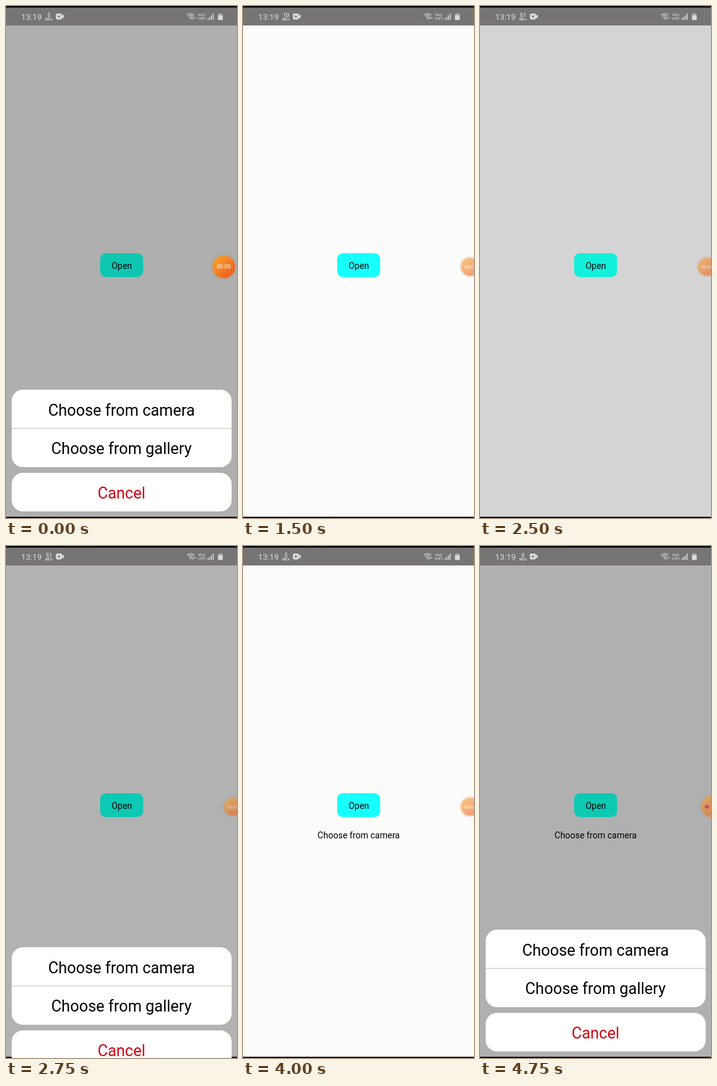
Write an HTML page that moves like this. It is 368 px wide and 816 px high and loops after 5 s.

```html
<!DOCTYPE html>
<html lang="en">
<head>
<meta charset="utf-8">
<title>Action sheet</title>
<style>
  html, body { margin: 0; width: 100%; height: 100%; overflow: hidden; background: #000; }
  svg { display: block; width: 368px; height: 816px; font-family: Roboto, Arial, sans-serif; }
  text { text-anchor: middle; }

  /* every state holds for a multiple of 250 ms (5 %) */
  .page, .button, .sheet, .result, .bubble, .clock, .dot, .rate text, .time text {
    animation: 5s step-end infinite;
  }

  .page { animation-name: page; }
  @keyframes page {
    0% { fill: #aeafae; }
    30% { fill: #fbfbf9; }
    50% { fill: #d4d4d4; }
    55% { fill: #b2b2b2; }
    70% { fill: #fbfbf9; }
    85% { fill: #cecece; }
    90%, 100% { fill: #b0b0b0; }
  }

  .button { animation-name: button; }
  @keyframes button {
    0% { fill: #0fc6b3; }
    30% { fill: #17ffff; }
    50% { fill: #12efdb; }
    55% { fill: #0dc9b4; }
    70% { fill: #17ffff; }
    85% { fill: #14e9d5; }
    90%, 100% { fill: #0dc9b4; }
  }

  .sheet { animation-name: sheet; font-size: 25px; }
  @keyframes sheet {
    0% { transform: none; }
    30% { transform: translateY(300px); }
    55% { transform: translateY(28px); }
    60% { transform: none; }
    70% { transform: translateY(300px); }
    90% { transform: translateY(7px); }
    95%, 100% { transform: none; }
  }

  .result { animation-name: late; }
  @keyframes late { 0% { opacity: 0; } 70%, 100% { opacity: 1; } }

  .bubble { animation-name: bubble; }
  @keyframes bubble {
    0% { transform: translate(347px, 415.5px); opacity: 1; }
    10% { transform: translate(358px, 415.5px); opacity: 1; }
    15% { transform: translate(360px, 415.5px) scale(.88); opacity: 1; }
    20% { transform: translate(361.5px, 415.5px) scale(.806); opacity: .8; }
    25% { transform: translate(361.5px, 415.5px) scale(.806); opacity: .6; }
    95%, 100% { transform: translate(371px, 415px); opacity: .6; }
  }

  .clock { animation-name: clock; }
  @keyframes clock { 0% { opacity: 1; } 95%, 100% { opacity: 0; } }
  .dot { animation-name: dot; }
  @keyframes dot { 0% { opacity: 0; } 95%, 100% { opacity: 1; } }

  .time { font-size: 9px; fill: #fff; }
  .time .t0 { animation-name: t0; }
  .time .t1 { animation-name: t1; }
  .time .t2 { animation-name: t2; }
  .time .t3 { animation-name: t3; }
  .time .t4 { animation-name: t4; }
  @keyframes t0 { 0% { opacity: 1; } 20%, 100% { opacity: 0; } }
  @keyframes t1 { 0% { opacity: 0; } 20% { opacity: 1; } 40%, 100% { opacity: 0; } }
  @keyframes t2 { 0% { opacity: 0; } 40% { opacity: 1; } 55%, 100% { opacity: 0; } }
  @keyframes t3 { 0% { opacity: 0; } 55% { opacity: 1; } 80%, 100% { opacity: 0; } }
  @keyframes t4 { 0% { opacity: 0; } 80%, 100% { opacity: 1; } }

  .rate { font-size: 9px; font-weight: 500; }
  .rate .r5 { animation-name: r5; }
  .rate .r10 { animation-name: r10; }
  .rate .r51 { animation-name: r51; }
  .rate .r0 { animation-name: r0; }
  @keyframes r5 { 0% { opacity: 1; } 15% { opacity: 0; } 65% { opacity: 1; } 85%, 100% { opacity: 0; } }
  @keyframes r10 { 0% { opacity: 0; } 15% { opacity: 1; } 40%, 100% { opacity: 0; } }
  @keyframes r51 { 0% { opacity: 0; } 40% { opacity: 1; } 65%, 100% { opacity: 0; } }
  @keyframes r0 { 0% { opacity: 0; } 85%, 100% { opacity: 1; } }
</style>
</head>
<body>
<svg viewBox="0 0 368 816" width="368" height="816">
  <defs>
    <linearGradient id="orange" x1="0.1" y1="0.1" x2="0.85" y2="0.95">
      <stop offset="0" stop-color="#f6a12e"/>
      <stop offset="1" stop-color="#ee5a1b"/>
    </linearGradient>
  </defs>

  <rect width="368" height="816"/>
  <rect class="page" y="31" width="368" height="783"/>
  <rect y="2.5" width="368" height="28.5" fill="#767475"/>

  <!-- status bar -->
  <g fill="#dcdcdc">
    <text x="40.5" y="22" font-size="13.3">13:19</text>
    <g class="rate">
      <text class="r5" x="68.5" y="18">5</text>
      <text class="r10" x="68.5" y="18">10</text>
      <text class="r51" x="68.5" y="18">51</text>
      <text class="r0" x="68.5" y="18">0</text>
    </g>
    <text x="68.5" y="23" font-size="5.4" font-weight="700">KB/s</text>
    <rect x="79.5" y="12" width="9.5" height="9.5" rx="2"/>
    <path d="M89 15.5l3-2v6.500l-3-2z"/>
    <circle cx="84.200" cy="16.700" r="1.700" fill="#767475"/>

    <g fill="none" stroke="#dcdcdc" stroke-width="1.200">
      <path d="M288.300 14.500a8.300 8.300 0 0 1 11.700 0"/>
      <path d="M290.300 16.700a5.500 5.500 0 0 1 7.700 0"/>
      <path d="M292.200 18.800a2.800 2.800 0 0 1 3.900 0"/>
    </g>
    <circle cx="294.200" cy="20.500" r="1"/>
    <path d="M296 19.500h3l-1.500 2.300zM298.300 19.500h4l-2-2.300z"/>
    <g font-size="6" font-weight="500">
      <text x="312" y="16">Vo))</text>
      <text x="312" y="22.300">LTE1</text>
    </g>
    <path d="M321 19.500h1.500v2.500h-1.500zM323.700 17.500h1.500v4.500h-1.500zM326.500 15h1.500v7h-1.500zM329.300 12h1.500v10h-1.500z"/>
    <path d="M339.700 11.500h3.600v1.200h2v2.300h-7.600v-2.300h2z" opacity=".55"/>
    <rect x="337.700" y="15" width="7.600" height="7.200" rx=".7"/>
  </g>

  <!-- page content -->
  <rect class="button" x="150" y="394" width="68.500" height="38" rx="9"/>
  <g font-size="14">
    <text x="184.500" y="418.500">Open</text>
    <text class="result" x="184.300" y="465.500">Choose from camera</text>
  </g>

  <g class="sheet">
    <rect x="9" y="611.500" width="350.500" height="123.500" rx="18" fill="#fff"/>
    <rect x="9" y="672.700" width="350.500" height="1" fill="#bdbdbd"/>
    <rect x="9" y="744" width="350.500" height="61.500" rx="18" fill="#fff"/>
    <text x="184" y="652.500">Choose from camera</text>
    <text x="184" y="714">Choose from gallery</text>
    <text x="184" y="784.500" fill="#d50012">Cancel</text>
  </g>

  <!-- recorder bubble -->
  <g class="bubble">
    <circle r="19.300" fill="none" stroke="#c08a70" stroke-opacity=".28" stroke-width="2.600"/>
    <circle r="18" fill="url(#orange)"/>
    <g class="clock">
      <g class="time">
        <text class="t0" y="3.300">00:00</text>
        <text class="t1" y="3.300">00:01</text>
        <text class="t2" y="3.300">00:02</text>
        <text class="t3" y="3.300">00:03</text>
        <text class="t4" y="3.300">00:04</text>
      </g>
    </g>
    <circle class="dot" cx="-9.500" cy="0.500" r="3.300" fill="#d8102c"/>
  </g>
</svg>
</body>
</html>
```
